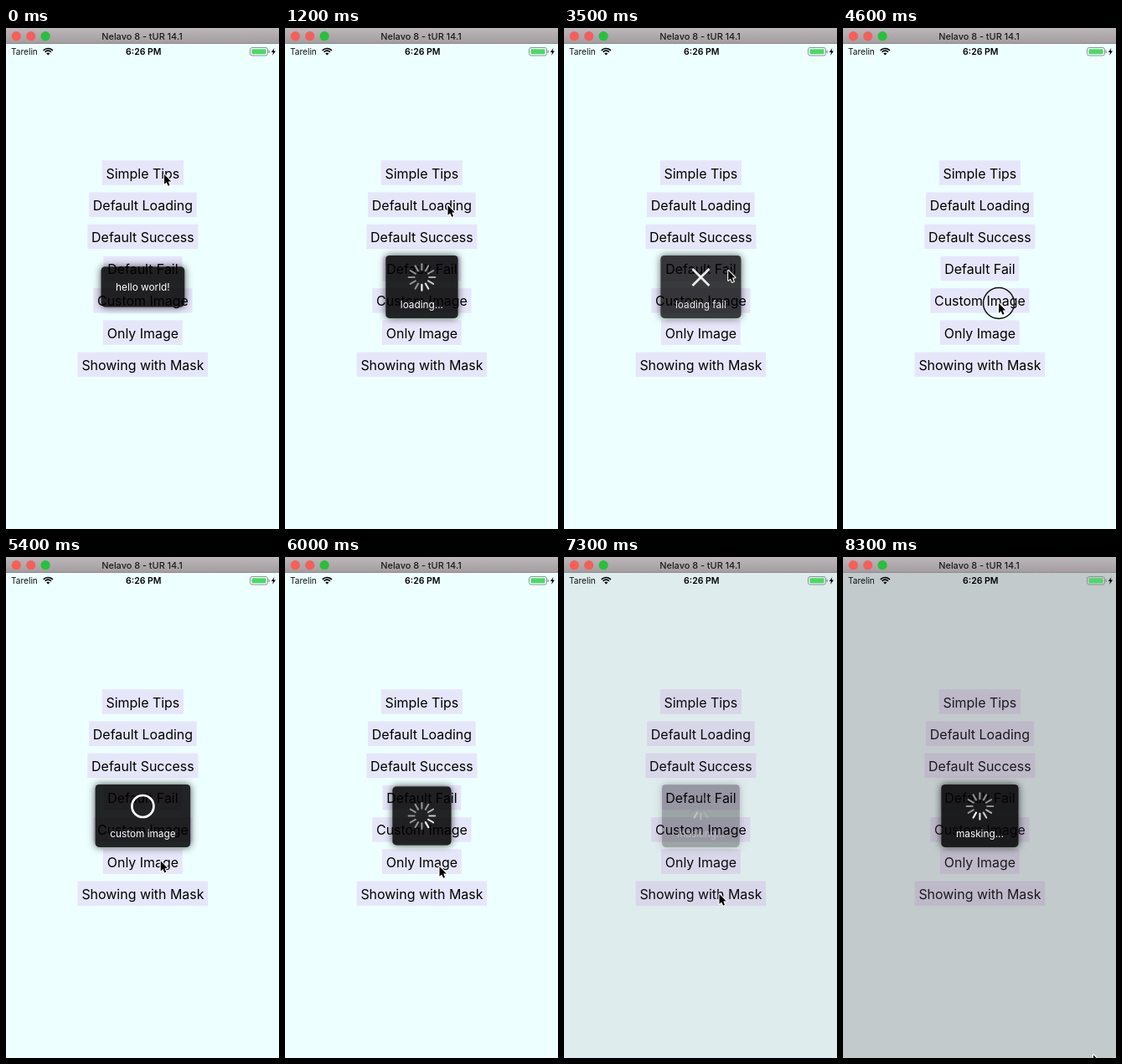
An HTML page with a canvas that plays this animation: 326x599 px, repeating every 8400 ms.

```html
<!DOCTYPE html>
<html lang="en">
<head>
<meta charset="utf-8">
<title>Toast demo</title>
<style>
  html, body { margin: 0; width: 100%; height: 100%; overflow: hidden; background: #eeffff; }
  canvas { display: block; width: 326px; height: 599px; }
</style>
</head>
<body>
<canvas id="stage" width="326" height="599"></canvas>
<script>
const ctx = document.getElementById('stage').getContext('2d');
const W = 326, H = 599, LOOP = 8400, STEP = 100, CX = 163.4;
const FONT = 'Inter, "Open Sans", sans-serif';
const LABEL_SIZE = 15.95, TOAST_SIZE = 11.8;
const LABELS = ['Simple Tips', 'Default Loading', 'Default Success', 'Default Fail',
  'Custom Image', 'Only Image', 'Showing with Mask'];

// Fades run inside [start, end]; lead is the brightest spinner blade at time `at`.
const TOASTS = [
  { start: -600, end: 700, text: 'hello world!' },
  { start: 900, end: 2000, text: 'loading...', icon: spinner, at: 1200, lead: 6 },
  { start: 2200, end: 3100, text: 'loading success', icon: tick },
  { start: 3300, end: 4300, text: 'loading fail', icon: cross },
  { start: 4700, end: 5600, text: 'custom image', icon: ring },
  { start: 5700, end: 7140, icon: spinner, at: 6000, lead: 5 },
  { start: 7200, end: 9000, text: 'masking...', icon: spinner, at: 8300, lead: 7, mask: true }
];

const CURSOR = [
  [0, 189, 175], [400, 189, 175], [800, 194.5, 212], [1700, 194.5, 212],
  [2000, 196, 250], [2300, 196, 250], [2600, 197.5, 298.5], [3200, 197, 290],
  [3900, 195, 290], [4400, 186, 329], [5100, 186, 329], [5500, 184.5, 370],
  [6600, 184.5, 370], [7000, 185.5, 403], [7500, 185.5, 403], [8300, 299, 595.5], [8400, 299, 595.5]
];
const CLICKS = [800, 2100, 3200, 4600, 5600, 7200];

const clamp = v => Math.max(0, Math.min(1, v));
const ease = v => v * v * (3 - 2 * v);

function text(str, x, y, size, { weight = 400, color = '#000', align = 'center' } = {}) {
  ctx.font = `${weight} ${size}px ${FONT}`;
  ctx.textAlign = align;
  ctx.textBaseline = 'alphabetic';
  ctx.fillStyle = color;
  ctx.fillText(str, x, y);
}

function textWidth(str, size) {
  ctx.font = `400 ${size}px ${FONT}`;
  return ctx.measureText(str).width;
}

function disc(x, y, r, color) {
  ctx.fillStyle = color;
  ctx.beginPath();
  ctx.arc(x, y, r, 0, Math.PI * 2);
  ctx.fill();
}

function box(x, y, w, h, r) {
  ctx.beginPath();
  ctx.roundRect(x, y, w, h, r);
}

function polyline(points, color, width) {
  ctx.strokeStyle = color;
  ctx.lineWidth = width;
  ctx.beginPath();
  points.forEach(([x, y]) => ctx.lineTo(x, y));
  ctx.stroke();
}

function titleBar() {
  const shade = ctx.createLinearGradient(0, 0, 0, 19);
  shade.addColorStop(0, '#bcb7ba');
  shade.addColorStop(1, '#a29c9f');
  ctx.fillStyle = shade;
  ctx.fillRect(0, 0, W, 19);
  ctx.fillStyle = '#8f8c8e';
  ctx.fillRect(0, 18, W, 1);
  ['#fb5d57', '#f2605a', '#28c03a'].forEach((c, i) => disc(12.3 + i * 17.4, 9.7, 5.6, c));
  text('Nelavo 8 - tUR 14.1', 162.5, 13.7, 10.9, { weight: 500, color: '#1c1b1c' });
}

function statusBar() {
  text('Tarelin', 6, 32, 10.1, { align: 'left', color: '#111' });
  text('6:26 PM', 164.3, 32, 10.5, { weight: 600 });

  ctx.strokeStyle = '#000';
  ctx.lineWidth = 1.7;
  for (const r of [7.7, 5]) {
    ctx.beginPath();
    ctx.arc(50.3, 32.2, r, -Math.PI * 0.76, -Math.PI * 0.24);
    ctx.stroke();
  }
  ctx.fillStyle = '#000';
  ctx.beginPath();
  ctx.moveTo(50.3, 32.4);
  ctx.arc(50.3, 32.4, 2.8, -Math.PI * 0.76, -Math.PI * 0.24);
  ctx.fill();

  ctx.strokeStyle = '#8b9494';
  ctx.lineWidth = 1;
  box(291.5, 23.5, 21, 9.5, 2.5);
  ctx.stroke();
  ctx.fillStyle = '#8b9494';
  ctx.fillRect(313.5, 26.7, 1.3, 3.2);
  ctx.fillStyle = '#4cd964';
  box(293.5, 25.3, 17, 6, 1.2);
  ctx.fill();
  ctx.fillStyle = '#000';
  ctx.beginPath();
  [[320.4, 24], [316.8, 29], [319, 29], [318.2, 32.7], [322, 27.6], [319.6, 27.6]]
    .forEach(([x, y]) => ctx.lineTo(x, y));
  ctx.fill();
}

function buttons() {
  LABELS.forEach((label, i) => {
    const y = 158.2 + i * 38.23, w = textWidth(label, LABEL_SIZE) + 9.5;
    ctx.fillStyle = '#e6e6fa';
    ctx.fillRect(CX - w / 2, y, w, 29.5);
    text(label, CX, y + 21.3, LABEL_SIZE);
  });
}

function spinner(y, toast, t) {
  const lead = toast.lead + Math.round((t - toast.at) * 12 / 1000);
  ctx.lineCap = 'round';
  for (let i = 0; i < 12; i++) {
    const age = (((lead - i) % 12) + 12) % 12;
    const a = i * Math.PI / 6, dx = Math.sin(a), dy = -Math.cos(a);
    const v = Math.round(255 - 110 * Math.min(1, age / 4));
    polyline([[CX + dx * 8.8, y + dy * 8.8], [CX + dx * 15.8, y + dy * 15.8]],
      `rgb(${v},${v},${v})`, 2.1);
  }
  ctx.lineCap = 'butt';
}

function tick(y) {
  polyline([[149, y], [157.5, y + 9], [178, y - 10]], '#fff', 2.7);
}

function cross(y) {
  polyline([[CX - 10, y - 10], [CX + 10, y + 10]], '#fff', 2.7);
  polyline([[CX + 10, y - 10], [CX - 10, y + 10]], '#fff', 2.7);
}

function ring(y) {
  ctx.strokeStyle = '#fff';
  ctx.lineWidth = 2.7;
  ctx.beginPath();
  ctx.arc(CX, y, 13, 0, Math.PI * 2);
  ctx.stroke();
}

function opacity(toast, t) {
  return ease(clamp((t - toast.start) / 250)) * ease(clamp((toast.end - t) / 200));
}

function drawMask(t) {
  const toast = TOASTS.find(item => item.mask);
  ctx.fillStyle = `rgba(92,80,86,${0.3 * opacity(toast, t)})`;
  ctx.fillRect(0, 19, W, H - 19);
}

// The shadow is clipped to the outside so that the panel stays translucent.
function panel(x, y, w, h) {
  const r = 4.5;
  ctx.save();
  box(x, y, w, h, r);
  ctx.rect(0, 0, W, H);
  ctx.clip('evenodd');
  ctx.shadowColor = 'rgba(0,0,0,0.7)';
  ctx.shadowBlur = 10;
  ctx.fillStyle = '#000';
  box(x, y, w, h, r);
  ctx.fill();
  ctx.restore();
  ctx.fillStyle = 'rgba(0,0,0,0.86)';
  box(x, y, w, h, r);
  ctx.fill();
}

function drawToast(toast, t) {
  const alpha = opacity(toast, t);
  if (!alpha) return;
  const { text: label, icon } = toast;
  const w = label ? textWidth(label, TOAST_SIZE) + 35 : 70;
  const h = !icon ? 48 : label ? 75 : 70;
  ctx.save();
  ctx.globalAlpha = alpha;
  panel(CX - w / 2, 309.4 - h / 2, w, h);
  if (icon) icon(label ? 298 : 309.5, toast, t);
  if (label) text(label, CX, icon ? 335.3 : 313.7, TOAST_SIZE, { color: '#fff' });
  ctx.restore();
}

function cursorAt(t) {
  const i = CURSOR.findIndex(key => key[0] > t);
  const [t0, x0, y0] = CURSOR[i - 1], [t1, x1, y1] = CURSOR[i];
  const k = ease((t - t0) / (t1 - t0));
  return [x0 + (x1 - x0) * k, y0 + (y1 - y0) * k];
}

function drawCursor(t) {
  const [x, y] = cursorAt(t);
  if (CLICKS.some(c => t >= c && t < c + STEP)) {
    ctx.strokeStyle = '#111';
    ctx.lineWidth = 1.5;
    ctx.beginPath();
    ctx.arc(x, y, 18.5, 0, Math.PI * 2);
    ctx.stroke();
  }
  ctx.save();
  ctx.translate(x, y);
  ctx.beginPath();
  [[0, 0], [0, 11.8], [2.7, 9.4], [4.6, 13.8], [6.5, 12.9], [4.7, 8.6], [8.2, 8.4]]
    .forEach(([px, py]) => ctx.lineTo(px, py));
  ctx.closePath();
  ctx.lineJoin = 'round';
  ctx.strokeStyle = '#fff';
  ctx.lineWidth = 2.2;
  ctx.stroke();
  ctx.fillStyle = '#000';
  ctx.fill();
  ctx.restore();
}

function draw(t) {
  ctx.fillStyle = '#eeffff';
  ctx.fillRect(0, 0, W, H);
  buttons();
  drawMask(t);
  titleBar();
  statusBar();
  TOASTS.forEach(toast => drawToast(toast, t));
  drawCursor(t);
}

const begin = performance.now();
function tickFrame() {
  const elapsed = (performance.now() - begin) % LOOP;
  draw(Math.floor(elapsed / STEP) * STEP);
  requestAnimationFrame(tickFrame);
}
tickFrame();
</script>
</body>
</html>
```
